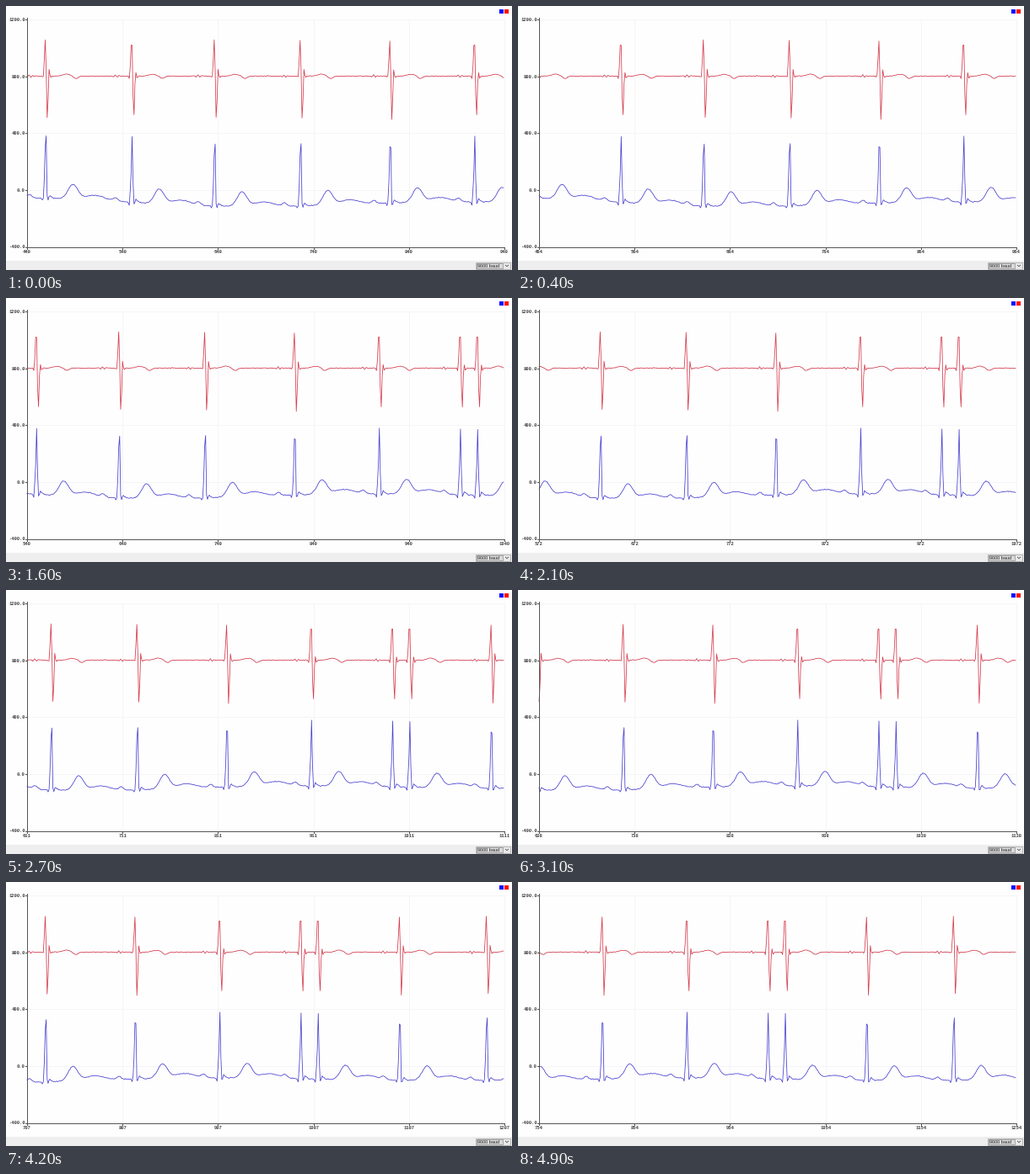
These frames come from a looping animation (600 by 314 pixels, 5 s). A matplotlib script:

```python
import numpy as np
import matplotlib.pyplot as plt
from matplotlib.animation import FuncAnimation
from matplotlib.patches import Rectangle

W, H, DPI = 600, 314, 100
FRAMES, INTERVAL = 50, 100
PX = 72 / DPI  # points per pixel
LEFT, RIGHT, TOP, BOTTOM = 25, 591, 16, 286.5
SPAN = 500
SCALE = (RIGHT - LEFT) / SPAN
RED_BASE = 83.4
FIRST, LAST = 440, 1290

# Times of the R peaks; the fraction decides how sampling clips each peak.
BEATS = [372, 460, 550.45, 637, 727, 820.9, 909.45, 994.45, 1012.45, 1097.9, 1189, 1281]

# QRS complex: (samples from R, pixels below the resting level)
BLUE_QRS = [(-5, 0), (-3.2, 4.5), (-1.45, -35), (-0.9, -67), (-0.45, -78), (0, -74),
            (0.1, -66), (0.55, -25), (1.1, 2), (2, 2), (3.5, -4), (5, -2), (8, 0)]
RED_QRS = [(-4.2, 0), (-3.2, 4), (-1.9, -20), (-1.45, -37), (-1.1, -44), (-0.45, -37),
           (0, -8), (1.05, 52), (1.55, 46), (3, -8), (3.55, -4), (4.5, 2.5), (6, 0)]

samples = np.arange(FIRST, LAST)
rng = np.random.default_rng(4)


def bump(d, centre, width):
    return np.exp(-0.5 * ((d - centre) / width) ** 2)


def qrs(d, knots):
    return np.interp(d, *zip(*knots), left=0, right=0)


def build_traces():
    # The resting level sways and settles.
    sway = np.exp((690 - samples) / 400) * np.cos(2 * np.pi * (samples - 690) / 460)
    blue = 234.9 + 3.5 * sway + rng.normal(0, 0.25, samples.size)
    red = RED_BASE + rng.normal(0, 0.2, samples.size)
    for i, r in enumerate(BEATS):
        d = samples - r
        blue += qrs(d, BLUE_QRS)
        red += qrs(d, RED_QRS)
        if i == 0 or r - BEATS[i - 1] > 40:  # P wave
            blue -= 3.5 * bump(d, -17.5, 2.3)
            red -= 1.7 * bump(d, -17, 2.3) * np.cos(np.pi * (d + 18) / 2)
        if i + 1 < len(BEATS) and BEATS[i + 1] - r > 40:  # T wave
            blue -= 17 * bump(d, 28, 5) + 5.5 * bump(d, 51, 10)
            red += 2.9 * bump(d, 31, 2.3) - 2.2 * bump(d, 21, 4)
    return blue, red


blue_trace, red_trace = build_traces()

fig = plt.figure(figsize=(W / DPI, H / DPI), dpi=DPI, facecolor="#fefefe")
ax = fig.add_axes([0, 0, 1, 1])
ax.set_xlim(0, W)
ax.set_ylim(H, 0)
ax.axis("off")


def line(x, y, color, width=1.0, z=1):
    return ax.plot(x, y, color=color, lw=width * PX, zorder=z)[0]


def box(x, y, w, h, color, edge="none"):
    ax.add_patch(Rectangle((x, y), w, h, fc=color, ec=edge, lw=0.8 * PX, zorder=4))


def label(x, y, text, ha="center", **style):
    style = {"family": "Liberation Mono", "weight": "bold", "size": 5.5 * PX,
             "color": "#444444", **style}
    return ax.text(x, y, text, ha=ha, va="center_baseline", zorder=6, **style)


GRID, AXIS = "#f5f5f7", "#555555"
columns = np.linspace(LEFT, RIGHT, 6)
rows = np.linspace(TOP, BOTTOM, 5)
for x in columns:
    line([x, x], [TOP, BOTTOM], GRID)
    line([x, x], [BOTTOM, BOTTOM + 2], AXIS, z=3)
for y, value in zip(rows, range(1200, -401, -400)):
    line([LEFT, RIGHT], [y, y], GRID)
    line([LEFT - 2, LEFT], [y, y], AXIS, z=3)
    label(22.6, y, f"{value:.1f}", "right")
line([LEFT, LEFT], [14, BOTTOM + 1], AXIS, z=3)
line([LEFT - 2, RIGHT], [BOTTOM, BOTTOM], AXIS, z=3)
ticks = [label(x, 292, "") for x in columns]

box(585, 4, 5, 5, "#0000ff")
box(591, 4, 5, 5, "#ff0000")

box(0, 303, W, 11, "#eeeeee")
box(557, 305, 41, 8, "#e8e8e8", "#aaaaaa")
box(558, 306, 31, 6, "#dadada", "#999999")
label(558.8, 308.9, "9600 baud", "left", family="Liberation Sans",
      weight="normal", size=5.5 * PX, color="#222222")
line([592.3, 594, 595.7], [308.2, 309.8, 308.2], "#555555", 0.8, 6)

x_trace = LEFT + SCALE * np.arange(SPAN)
blue_line = line(x_trace, blue_trace[:SPAN], "#4a42d0", 0.8, 2)
red_line = line(x_trace, red_trace[:SPAN], "#d63c4e", 0.8, 2)


def update(frame):
    # The scroll speed varies slightly with the incoming data.
    offset = int(round(np.interp(frame, [0, 9, 16, 27, 31, 42, 49],
                                 [440, 495, 540, 611, 638, 707, 754])))
    window = slice(offset - FIRST, offset - FIRST + SPAN)
    blue_line.set_ydata(blue_trace[window])
    red_line.set_ydata(red_trace[window])
    for i, tick in enumerate(ticks):
        tick.set_text(str(offset + 100 * i))
    return [blue_line, red_line, *ticks]


animation = FuncAnimation(fig, update, frames=FRAMES, interval=INTERVAL,
                          repeat=True, repeat_delay=0)
plt.show()
```
